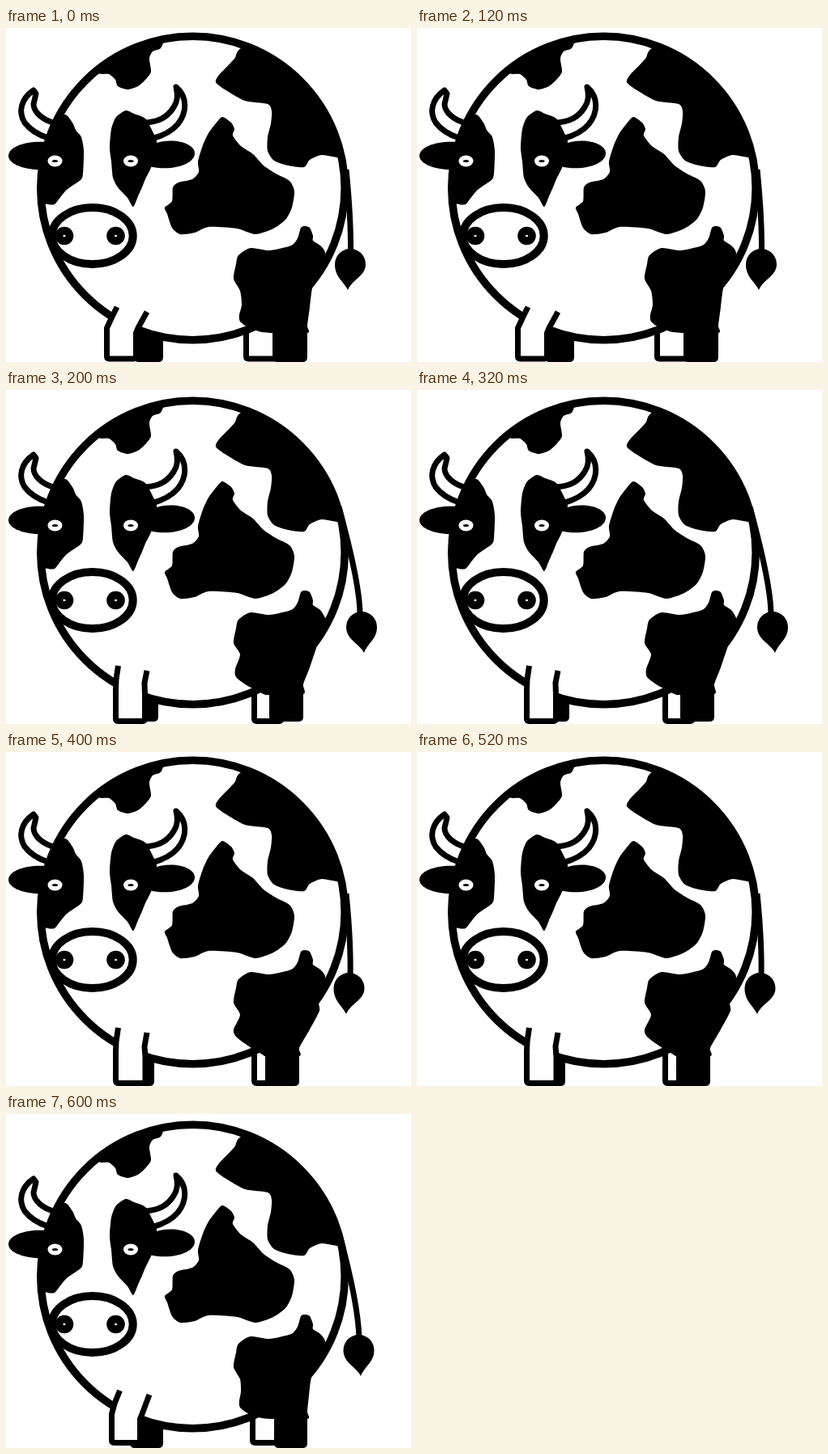
Recreate the animation shown at these times as an HTML page. Size 500x413 px, loop 0.8 s.

```html
<!DOCTYPE html>
<html lang="en">
<head>
<meta charset="utf-8">
<title>Walking cow</title>
<style>
  html, body { margin: 0; width: 100%; height: 100%; overflow: hidden; background: #fff; }
  svg { display: block; width: 100vw; height: 100vh; }
  .line { fill: #fff; stroke: #000; stroke-width: 7; stroke-linejoin: round; }
</style>
</head>
<body>
<svg viewBox="0 0 500 413" preserveAspectRatio="none">
  <clipPath id="round"><circle cx="230.5" cy="198" r="190"/></clipPath>
  <path id="tail" class="line" style="fill:none"/>
  <path id="tuft"/>
  <path id="farFront"/>
  <path id="farRear" class="line"/>
  <g id="body">
    <path class="line" d="M34 77C18 88 15 104 23 117Q33 130 52 136L62 118C44 114 34 103 34 94Q36 86 37 81Z"/>
    <circle cx="230.5" cy="198" r="187.7" fill="#fff" stroke="#000" stroke-width="9.6"/>
    <path class="line" d="M210 73C225 86 223 105 212 119Q202 131 180 137L168 117C190 117 200 109 207 98Q214 88 210 73Z"/>
    <path d="M50 141C24 139 3 147 3 158S26 177 52 175Z"/>
    <path d="M180 144C205 134 233 142 233 155S206 178 176 171Z"/>
    <g id="spots" clip-path="url(#round)"></g>
    <g id="eyes"></g>
    <ellipse cx="106.7" cy="257" rx="50" ry="35" fill="#fff" stroke="#000" stroke-width="10"/>
    <g id="nose"></g>
  </g>
  <path id="hip"/>
  <path id="nearRear"/>
  <path id="nearFront" class="line"/>
</svg>
<script>
const $ = id => document.getElementById(id);
const set = (id, d) => $(id).setAttribute('d', d);

// Closed, gently rounded outline through "x,y" points.
function blob(text) {
  const p = text.trim().split(/\s+/).map(s => s.split(',').map(Number));
  const n = p.length, at = i => p[(i + n) % n];
  const lean = (a, b, c, k) => [a[0] + (c[0] - b[0]) * k, a[1] + (c[1] - b[1]) * k];
  let d = 'M' + p[0];
  for (let i = 0; i < n; i++) {
    d += `C${lean(at(i), at(i - 1), at(i + 1), .12)} ${lean(at(i + 1), at(i), at(i + 2), -.12)} ${at(i + 1)}`;
  }
  return d + 'Z';
}

// Straight leg with rounded feet.
const leg = (l, r, top, foot, c = 6) =>
  `M${l} ${top}V${foot - c}Q${l} ${foot} ${l + c} ${foot}H${r - c}Q${r} ${foot} ${r} ${foot - c}V${top}Z`;

const spots = [
  '114,56 127,57 135,64 138,72 150,76 163,72 173,63 179,54 177,38 181,29 191,25 193,14 170,-6 120,0 90,40',
  '290,25 282,38 263,58 259,67 270,76 295,90 323,94 328,103 327,118 323,135 323,152 331,164 348,170 368,172 375,163 390,157 412,160 450,155 430,70 340,0',
  '267,110 278,117 282,125 280,133 290,146 305,156 318,170 333,180 350,189 356,202 353,222 345,237 330,248 308,255 285,248 250,246 233,253 215,255 205,247 199,230 196,222 205,214 206,197 213,191 230,187 238,178 237,165 243,145 250,130 259,118',
  '72,107 82,117 86,126 93,135 96,152 95,180 92,188 75,200 65,212 60,218 52,218 44,212 38,160 50,125',
  '148,102 158,106 172,112 182,130 186,141 180,170 172,187 168,197 163,208 157,221 150,210 138,197 132,185 130,165 128,148 130,125 136,110'
];
$('spots').innerHTML = spots.map(s => `<path d="${blob(s)}"/>`).join('');
$('eyes').innerHTML = [60.5, 154].map(x =>
  `<ellipse cx="${x}" cy="164.5" rx="9" ry="7" fill="#fff"/><ellipse cx="${x}" cy="164.5" rx="3.6" ry="1.6"/>`).join('');
$('nose').innerHTML = [72, 135.5].map(x =>
  `<circle cx="${x}" cy="257" r="11.3"/><ellipse cx="${x}" cy="257" rx="1.6" ry="1.2" fill="#fff"/>`).join('');

const hipTop = dy => '364,247 369,245 375,247 379,257 379,263 388,269 394,279'.replace(/,(\d+)/g, (m, y) => ',' + (+y + dy));
const hipLeft = dy => '281,310 284,292 287,281 302,272 325,275 352,269 360,260'.replace(/,(\d+)/g, (m, y) => ',' + (+y + dy));

// near: [left, right, foot, upper left line, upper right line]; far and rear: [left, right, foot]
const poses = [
  { dy: 0, tail: 'M420 175Q426 235 425.5 278', tuft: [425, 292, 422],
    near: [124.5, 160.5, 409, 'M137 345L131 357', '163 371L174 351'], far: [158, 194, 413],
    white: [296.5, 334, 409], black: [329, 372, 413],
    hip: '385,305 378,322 375,345 372,368 372,377 330,377 316,376 300,371 289,363 288,355 291,342 289,325' },
  { dy: 3, tail: 'M411 145Q437 240 437 278', tuft: [439, 293, 442],
    near: [135.5, 171.5, 409.5, 'M138.5 341L136 358', '171 362L174 347'], far: [150, 188, 410],
    white: [306.5, 340, 409.5], black: [325, 367, 410],
    hip: '392,290 383,319 375,343 367,364 367,376 325,377 318,376 297,365 284,355 283,345 289,327' },
  { dy: 0, tail: 'M420 175Q426 235 425 278', tuft: [423.5, 292, 420],
    near: [135.5, 172, 409.5, 'M138.5 341L136 358', '171 364L174 347'], far: [150, 183, 413],
    white: [306.5, 340, 409.5], black: [320, 362, 413],
    hip: '386,308 387,320 375,343 362,366 362,376 320,376 318,375 300,364 284,352 281,343 289,325' },
  { dy: 3, tail: 'M412 150Q435 235 436 278', tuft: [435.5, 292, 438],
    near: [130.5, 165.5, 406.5, 'M140.5 342L134 358', '168 371L177 347'], far: [153, 194, 413],
    white: [304.5, 340, 406.5], black: [331, 372, 413],
    hip: '387,305 377,326 374,348 372,368 372,377 331,377 316,376 300,371 289,363 288,355 290,343 289,328' }
];

function pose({ dy, tail, tuft: [x, y, tip], near: [l, r, foot, left, right], far, white, black, hip }) {
  $('body').setAttribute('transform', `translate(0 ${dy})`);
  set('tail', tail);
  set('tuft', `M${x - 19} ${y}A19 19 0 0 1 ${x + 19} ${y}C${x + 19} ${y + 15} ${tip + 6} ${y + 18} ${tip} ${y + 32}C${tip - 6} ${y + 20} ${x - 19} ${y + 16} ${x - 19} ${y}Z`);
  set('farFront', leg(far[0], far[1], 360, far[2]));
  set('farRear', leg(white[0], white[1], 355, white[2], 3));
  set('hip', blob(`${hipTop(dy)} ${hip} ${hipLeft(dy)}`));
  set('nearRear', leg(black[0], black[1], 368, black[2]));
  set('nearFront', `${left}L${l} 371V${foot - 3}Q${l} ${foot} ${l + 3} ${foot}H${r - 3}Q${r} ${foot} ${r} ${foot - 3}V377L${right}`);
}

let shown = -1;
function tick() {
  const i = Math.floor(performance.now() % 800 / 200);
  if (i !== shown) pose(poses[shown = i]);
  requestAnimationFrame(tick);
}
tick();
</script>
</body>
</html>
```
